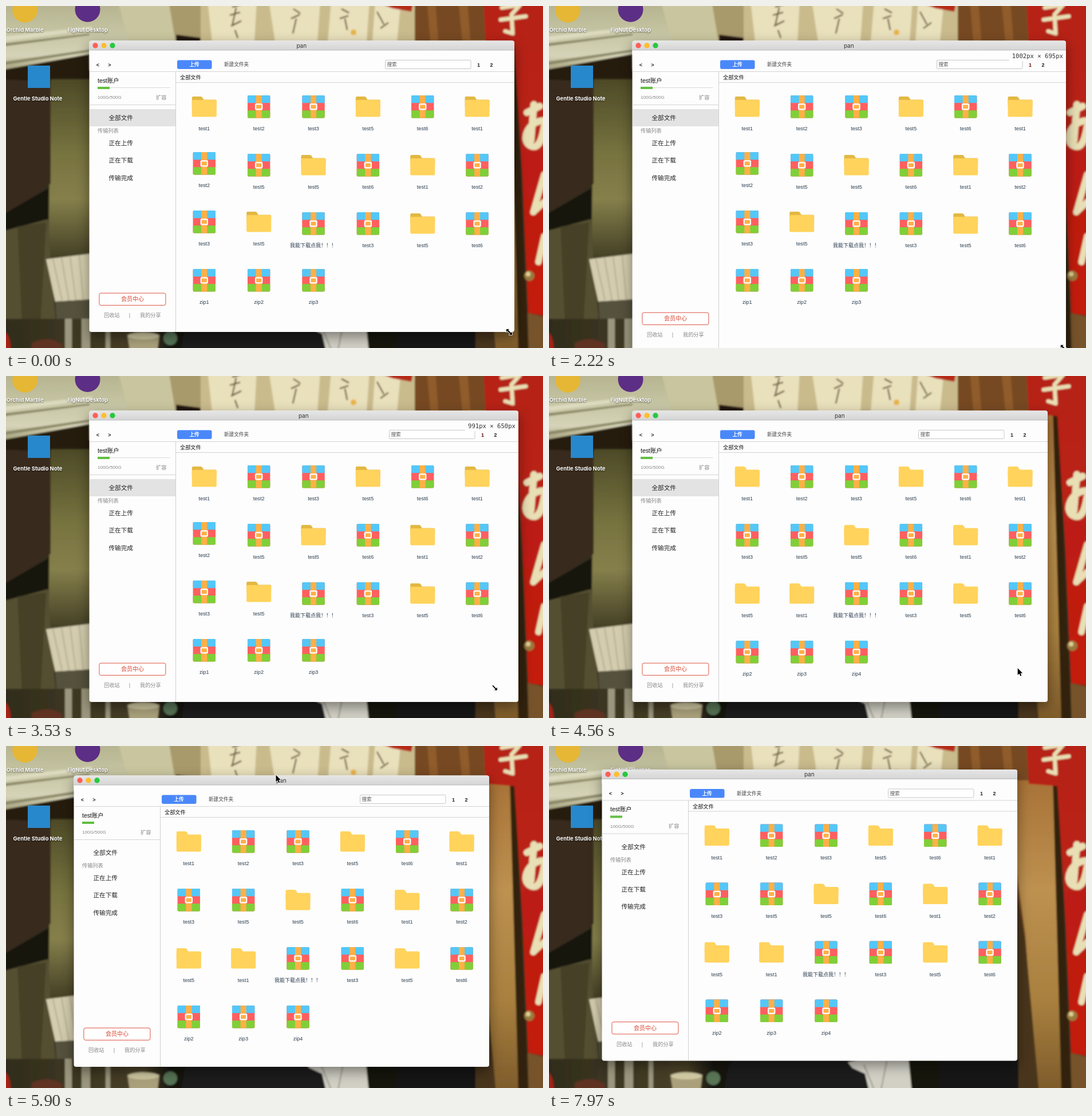
Write an HTML page that moves like this. It is 938 px wide and 597 px high and loops after 8.57 s.

```html
<!DOCTYPE html>
<html lang="zh">
<head>
<meta charset="utf-8">
<title>pan</title>
<style>
html, body { margin: 0; width: 100%; height: 100%; overflow: hidden; background: #252116; }
svg { display: block; width: 938px; height: 597px; }
text { font-family: "Liberation Sans", Arial, "Noto Sans CJK SC", "Noto Sans CJK", sans-serif; white-space: pre; }
.ui { font-family: Inter, "Noto Sans CJK SC", sans-serif; }
.mono { font-family: "DejaVu Sans Mono", monospace; }
.desk { font-family: Inter, sans-serif; font-weight: 700; filter: drop-shadow(0 1px 1px rgba(0,0,0,.6)); }
#frame { filter: drop-shadow(0 8px 11px rgba(0,0,0,.42)); }
</style>
</head>
<body>
<svg id="stage" viewBox="0 0 938 597" xmlns="http://www.w3.org/2000/svg">
<defs>
  <filter id="soft" x="-5%" y="-5%" width="110%" height="110%"><feGaussianBlur stdDeviation="1.4"/></filter>
  <linearGradient id="bar" x2="0" y2="1"><stop stop-color="#e6e6e6"/><stop offset="1" stop-color="#cfcfcf"/></linearGradient>
  <linearGradient id="wall" x2="0" y2="1"><stop stop-color="#b3b18d"/><stop offset=".45" stop-color="#c5c4a2"/><stop offset=".8" stop-color="#d6d4b8"/><stop offset="1" stop-color="#a19d78"/></linearGradient>
  <linearGradient id="olive" x2="0" y2="1"><stop stop-color="#4d4a27"/><stop offset=".4" stop-color="#77733f"/><stop offset=".65" stop-color="#857f4b"/><stop offset="1" stop-color="#3d3921"/></linearGradient>
  <linearGradient id="wood" x2="0" y2="1"><stop stop-color="#a87237"/><stop offset=".35" stop-color="#bd9150"/><stop offset=".7" stop-color="#a9803f"/><stop offset="1" stop-color="#7c5a2a"/></linearGradient>
  <linearGradient id="red" x2="0" y2="1"><stop stop-color="#b52415"/><stop offset="1" stop-color="#c31a0f"/></linearGradient>
  <linearGradient id="floor" x2="1"><stop stop-color="#2f2b1b"/><stop offset=".3" stop-color="#4a4128"/><stop offset=".36" stop-color="#15140f"/><stop offset="1" stop-color="#191712"/></linearGradient>
  <g id="zip">
    <rect x="-19.7" y="-19.7" width="39.4" height="39.4" rx="2" fill="#ff5f5f"/>
    <path d="M-19.7-6.5V-17.7q0-2 2-2H17.7q2 0 2 2V-6.5z" fill="#54c7f8"/>
    <path d="M-19.7 6.5V17.7q0 2 2 2H17.7q2 0 2-2V6.5z" fill="#80cf38"/>
    <path d="M-5-19.7H5V19.7H-5z" fill="#ffb046"/>
    <rect x="-5.6" y="-4.5" width="11.2" height="9" rx=".8" fill="#ffb046" stroke="#fff" stroke-width="2.2"/>
  </g>
  <g id="folder">
    <path class="tab" d="M-21.5 0V-15.5q0-2.2 2.2-2.2H-6q1.7 0 2.7 1.5L-1-12.4H19.5q2 0 2 2V0z"/>
    <path d="M-21.5-9.5q0-2.2 2.2-2.2H19.5q2 0 2 2V15.4q0 2.2-2.2 2.2H-19.3q-2.2 0-2.2-2.2z" fill="#ffd35c"/>
  </g>
</defs>
<g filter="url(#soft)">
  <path d="M-9-9H947V606H-9z" fill="#332d1b"/>
  <path d="M-9-9H300V112H-9z" fill="url(#wall)"/>
  <path d="M-9 54L150 36V42L-9 62z" fill="#dcdabf"/>
  <path d="M-9 66L146 48V51L-9 71zM-9 98L146 76V80L-9 104z" fill="#8c8967"/>
  <path d="M195-9H300V62H215z" fill="#c9c69f"/>
  <path d="M-9 112L146 84V140L80 148L-9 160z" fill="#251b0e"/>
  <path d="M78 128H150V450H74z" fill="url(#olive)"/>
  <path d="M-9 128L78 132V310L-9 372z" fill="#38291a"/>
  <path d="M-9 366L74 318V372L-9 394z" fill="#17150d"/>
  <path d="M-9 394L74 372L78 450L92 606H-9z" fill="#555031"/>
  <path d="M20 385L70 378L60 560L30 600z" fill="#454026"/>
  <path d="M70 442L150 432V512L86 516z" fill="#d3ccae"/>
  <path d="M82 442L98 514M97 440L110 514M112 438L122 514M128 435L135 513" stroke="#b3ac8f" stroke-width="2"/>
  <path d="M86 516L150 512V606H92z" fill="#55513d"/>
  <path d="M284-9H352L340 62H296z" fill="#a99a6c"/>
  <path d="M297 50L345 56V70H297z" fill="#24190f"/>
  <path d="M340-9H725V70H340z" fill="#c9bb8c"/>
  <path d="M352-9H438L434 62H360zM459-9H549L544 62H470zM568-9H635L630 62H562zM645-9H690L683 62H640z" fill="#e9e0bc"/>
  <path d="M395 2l16-5M391 16l18-5M402 3l-7 32M393 35l18-9M400 42l5 14M502 5l12 8M498 22l15-7M507 22l-6 26M586 5l13 7M583 22l15-5M592 22l4 20M648 10l12 22M654 39l14-10" fill="none" stroke="#6d6040" stroke-width="2.6"/>
  <circle cx="607" cy="46" r="5" fill="#e9b345"/>
  <path d="M640-9H712L708 10L675 4z" fill="#b52b18"/>
  <path d="M714-9H845V606H810V70H714z" fill="#774923"/>
  <path d="M735-9H750L756 70H742zM790-9H806L812 70H798z" fill="#8f5c2b"/>
  <path d="M808 60H884L898 606H852L832 330L814 200z" fill="url(#wood)"/>
  <path d="M810 210L832 340L856 606H810z" fill="#49351c"/>
  <path d="M880 60H889L912 606H895z" fill="#33240f"/>
  <path d="M834-9H947V542L912 536L902 300L888 70L838 66z" fill="url(#red)"/>
  <path d="M911 536L947 544V606H913z" fill="#76522a"/>
  <g fill="none" stroke="#e9dfb5" stroke-linecap="round" stroke-linejoin="round">
    <path stroke-width="7" d="M866 3L898-2L883 15L885 48L872 44M864 24L908 18"/>
    <path stroke-width="12" d="M910 186L932 175M922 172L917 235M940 200C912 200 898 235 916 244S938 220 940 210"/>
    <path stroke-width="11" d="M940 294L921 360L940 342M940 402L930 447"/>
  </g>
  <circle cx="914" cy="471" r="9" fill="#997a3c"/><circle cx="912" cy="468" r="4" fill="#dfcf96"/>
  <path d="M-9 546H820V606H-9z" fill="url(#floor)"/>
  <path d="M305 606L314 556L335 540H590L625 606z" fill="#1d1c1a"/>
  <path d="M522 552L550 546H628L634 606H560L552 572L530 562z" fill="#d2d0c5"/>
  <path d="M550 556L568 600M590 550L580 600" stroke="#a3a196" stroke-width="2.500"/>
  <path d="M212 574Q238 564 268 574L264 606H217z" fill="#aaa17c"/><ellipse cx="240" cy="576" rx="27" ry="6" fill="#d2caa4"/>
  <circle cx="287" cy="580" r="12" fill="#587457"/>
  <path d="M103 546H115V606H103zM132 546H147V606H132zM174 546H182V606H174z" fill="#9b967d"/>
  <path d="M-9 566Q10 570 8 606H-9z" fill="#a52116"/>
  <path d="M45 588Q75 574 98 590V606H45z" fill="#5e3320"/>
</g>
<circle cx="33" cy="7" r="22" fill="#e5b735"/>
<circle cx="142.5" cy="6" r="22" fill="#5c2e85"/>
<rect x="38" y="104" width="39" height="39" fill="#2888cc"/>
</svg>
<script>
const stage = document.getElementById('stage');

function el(parent, tag, attrs = {}, content) {
  const node = document.createElementNS('http://www.w3.org/2000/svg', tag);
  for (const key in attrs) node.setAttribute(key, attrs[key]);
  if (content) node.textContent = content;
  parent.appendChild(node);
  return node;
}
const label = (parent, x, y, size, fill, content, more) =>
  el(parent, 'text', { x, y, 'font-size': size, fill, ...more }, content);
const rect = (parent, x, y, width, height, fill, more) =>
  el(parent, 'rect', { x, y, width, height, fill, ...more });
const show = (node, on) => { node.style.display = on ? '' : 'none'; };
const middle = { 'text-anchor': 'middle' };

const desk = { ...middle, class: 'desk' };
label(stage, 33, 45, 9.4, '#fff', 'Orchid Marble', desk);
label(stage, 142.5, 44.5, 9.4, '#fff', 'FigNut Desktop', desk);
label(stage, 55.5, 165, 9.4, '#fff', 'Gentle Studio Note', desk);

// The window is laid out in stage coordinates and then shifted as a whole.
const LEFT = 145.5, TOP = 60.5;
const win = el(stage, 'g');
const frame = rect(win, LEFT, TOP, 0, 0, '#fdfdfd', { rx: 4, id: 'frame' });
const bar = rect(win, LEFT, TOP, 0, 22, 'url(#bar)', { rx: 4 });
const cover = rect(win, LEFT, 77, 0, 8, '#fdfdfd');
const lines = [[LEFT, 76.5, '#b9b9b9'], [LEFT, 114, '#d4d4d4'], [296.5, 133, '#d4d4d4']]
  .map(([x, y, fill]) => ({ x, node: rect(win, x, y, 0, 1, fill) }));
['#ff5f57', '#ffbd2e', '#28c840'].forEach((fill, i) =>
  el(win, 'circle', { cx: 156 + 15 * i, cy: 69, r: 4.7, fill }));
const title = label(win, 0, 72.7, 10, '#333', 'pan', { ...middle, class: 'ui' });

label(win, 160.5, 105.5, 9, '#222', '<', { ...middle, 'font-weight': 700 });
label(win, 181, 105.5, 9, '#222', '>', { ...middle, 'font-weight': 700 });
rect(win, 299, 94.5, 60.5, 15.5, '#4a88fa', { rx: 3 });
label(win, 329, 105.4, 8.6, '#fff', '上传', { ...middle, 'font-weight': 700 });
label(win, 381, 105.4, 8.6, '#444', '新建文件夹');
label(win, 304, 128.3, 9.2, '#111', '全部文件', { 'font-weight': 500 });

const tools = el(win, 'g');
rect(tools, -225.5, 94.5, 149.5, 15, '#fff', { rx: 1.5, stroke: '#c8c8c8' });
label(tools, -222.5, 105.4, 8.6, '#555', '搜索');
const one = label(tools, -62.5, 105.5, 9, '#222', '1', { ...middle, 'font-weight': 700 });
label(tools, -40, 105.5, 9, '#222', '2', { ...middle, 'font-weight': 700 });

const side = rect(win, 296, 114, 1, 0, '#d0d0d0');
label(win, 160, 133.7, 10.4, '#111', 'test账户');
const track = rect(win, 160, 142, 126.5, 1, '#d9d9d9');
rect(win, 160, 141, 21, 4, '#62bf42');
label(win, 160, 162.2, 8.1, '#888', '100G/500G');
label(win, 262, 162.5, 9.2, '#888', '扩容');
rect(win, LEFT, 172, 151, 1, '#d4d4d4');
const selected = rect(win, 146, 180, 150, 30, '#e3e3e3');
['全部文件', '正在上传', '正在下载', '传输完成'].forEach((name, i) =>
  label(win, 179.5, i ? 213 + 30.2 * i : 199, 10.6, '#222', name));
label(win, 160, 221, 9.2, '#888', '传输列表');

const foot = el(win, 'g');
rect(foot, 162.9, -67.8, 116, 21.2, '#fff', { rx: 3, stroke: '#dd5545' });
label(foot, 221, -53.6, 10, '#d8432f', '会员中心', middle);
label(foot, 171, -25.6, 9.2, '#888', '回收站');
label(foot, 216, -26, 9.2, '#888', '|', middle);
label(foot, 234, -25.6, 9.2, '#888', '我的分享');

// A trailing slash marks a folder; everything else is an archive.
function fileGrid(names, shift) {
  const grid = el(win, 'g', { style: `--tab:${shift ? '#e3b843' : '#ffd35c'}` });
  names.split(' ').forEach((entry, i) => {
    const name = entry.replace('/', '');
    const row = Math.floor(i / 6), col = i % 6;
    const raised = row === 3 || col < row;
    const x = 346.3 + 95.35 * col, y = 102 * row - (raised ? shift : 0);
    el(grid, 'use', { href: entry === name ? '#zip' : '#folder', x, y: 175.8 + y });
    const cjk = name.length > 5;
    label(grid, cjk ? 496 : x, 217.2 + y, cjk ? 9 : 9.1, '#2c3e50', name, cjk ? {} : middle);
  });
  return grid;
}
document.querySelector('.tab').style.fill = 'var(--tab)';
const before = fileGrid('test1/ test2 test3 test5/ test6 test1/ test2 test5 test5/ test6 test1/ test2 ' +
  'test3 test5/ 我能下载点我！！！ test3 test5/ test6 zip1 zip2 zip3', 3);
const after = fileGrid('test1/ test2 test3 test5/ test6 test1/ test3 test5 test5/ test6 test1/ test2 ' +
  'test5/ test1/ 我能下载点我！！！ test3 test5/ test6 zip2 zip3 zip4', 0);

const counter = el(win, 'g');
const counterBack = rect(counter, 0, 78, 0, 18, '#fdfdfd');
const counterText = label(counter, -5, 91, 10.6, '#333', '', { 'text-anchor': 'end', class: 'mono' });

const cursor = el(stage, 'g');
const outline = { stroke: '#fff', 'stroke-width': 1.6, 'paint-order': 'stroke', 'stroke-linejoin': 'round' };
const shapes = {
  both: 'M-5-5H0L-1.7-3.3L3.3 1.7L5 0V5H0L1.7 3.3L-3.3-1.7L-5 0z',
  single: 'M-3.6-4.4L2.2 1.4L4-.5V4.5H-1L.8 2.7L-4.4-3z',
  arrow: 'M0 0V12L2.8 9.5L4.7 13.8L6.7 12.9L4.8 8.7H8.5z'
};
const pointer = el(cursor, 'path', outline);

const STEP = 147, LOOP = 8570, START = 1050;
const corners = [[-1, 888, 569], [0, 890, 569], [3, 911, 573], [5, 914, 590], [7, 905, 604],
  [12, 897, 597], [15, 896, 569], [17, 895, 569], [20, 881, 569], [23, 871, 569]];
const shifts = [[31, 0, 0], [32, 0, -.8], [33, -27, -9], [34, -51, -17.5], [35, -53, -19.5]];
const pointers = [[-1, 879, 569], [3, 908, 578], [5, 914, 590], [7, 902, 603], [12, 886, 572],
  [17, 854, 544], [23, 840, 530], [26, 776, 470], [27, 776, 470], [28, 700, 270], [30, 520, 80],
  [32, 497, 59], [34, 446, 42], [35, 490, 63], [36, 712, 302], [40, 800, 544], [42, 804, 550],
  [44, 804, 550], [45, 816, 553], [46, 831, 564]];

function at(keys, k) {
  const i = keys.findIndex(key => key[0] >= k);
  if (i === 0) return keys[0].slice(1);
  if (i < 0) return keys[keys.length - 1].slice(1);
  const a = keys[i - 1], b = keys[i], p = (k - a[0]) / (b[0] - a[0]);
  return [a[1] + (b[1] - a[1]) * p, a[2] + (b[2] - a[2]) * p];
}
const move = (node, x, y) => node.setAttribute('transform', `translate(${x} ${y})`);

function draw(k) {
  const [right, bottom] = at(corners, k).map(Math.round);
  const width = right - LEFT, height = bottom - TOP;
  frame.setAttribute('width', width);
  frame.setAttribute('height', height);
  bar.setAttribute('width', width);
  cover.setAttribute('width', width);
  lines.forEach(({ x, node }) => node.setAttribute('width', right - x));
  side.setAttribute('height', bottom - 114);
  title.setAttribute('x', (LEFT + right) / 2 - .5);
  move(tools, right, 0);
  move(foot, 0, bottom);
  move(win, ...at(shifts, k));

  const resizing = k >= 0 && k < 24;
  show(counter, resizing);
  if (resizing) {
    const size = `${Math.round((right - 145) * 1.3215)}px × ${Math.round((bottom - 60.4) * 1.3215 - 22)}px`;
    const back = size.length * 6.38 + 10;
    counterText.textContent = size;
    counterBack.setAttribute('x', -back);
    counterBack.setAttribute('width', back - 1);
    move(counter, right, 0);
  }
  one.setAttribute('fill', resizing ? '#6a1010' : '#222');
  show(before, k < 20);
  show(after, k >= 20);
  show(track, k < 33);
  show(selected, k < 33);

  const kind = k < 17 || k >= 42 ? 'both' : k < 24 ? 'single' : 'arrow';
  pointer.setAttribute('d', shapes[kind]);
  move(cursor, ...at(pointers, k));
  show(cursor, k < 47);
}

let shown = null;
function tick() {
  const t = performance.now() % LOOP;
  const k = t < START ? -1 : Math.floor((t - START + 20) / STEP);
  if (k !== shown) draw(shown = k);
  requestAnimationFrame(tick);
}
tick();
</script>
</body>
</html>
```
